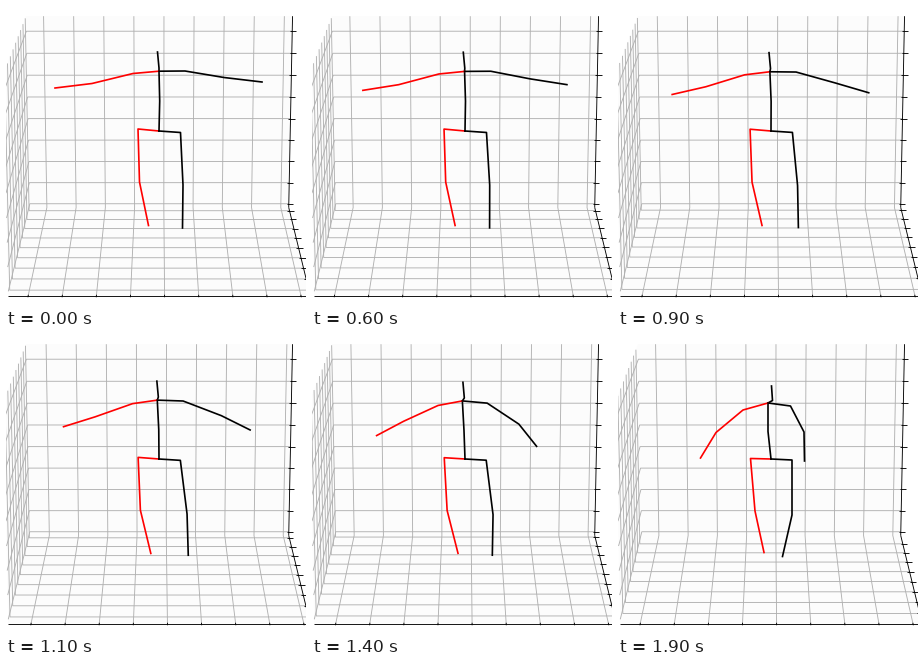
Animation, 300 px wide and 300 px high, one loop 2000 ms. Source, as a matplotlib script:

```python
import numpy as np
import matplotlib.pyplot as plt
from matplotlib.animation import FuncAnimation
from matplotlib.collections import LineCollection, PolyCollection

SIZE, DPI = 300, 80
FRAMES, STEP = 20, 100
LAST = (FRAMES - 1) * STEP

# Camera, in units of half the box width
ELEV = np.radians(15)
DIST, FOCAL = 12.4, 1755
CX, CY = 153.3, 141.2
TOP = 0.75          # half the box height
LIMIT = 0.96        # ticks stay inside the box margin
GAP = 0.2259        # tick spacing
HEIGHTS = TOP * LIMIT * (2 * np.arange(9) * 0.2 / 1.7 - 1)


def drift(t):
    """Slow start, still speeding up at the end."""
    return (t / LAST) ** 2.5


def swing(t):
    """Slow start and soft stop."""
    u = (t / LAST) ** 1.9
    return u * u * (3 - 2 * u)


def along(points, s):
    """Point on the line or quadratic curve given by its control points."""
    pts = np.asarray(points, float)
    while len(pts) > 1:
        pts = pts[:-1] + s * (pts[1:] - pts[:-1])
    return pts[0]


# Limbs: colour, easing, and the path of each joint after the root
HIP = [(153, 125)]
THORAX = [(153, 65.2), (149, 67), (150, 69)]
LIMBS = [
    ("red", drift, HIP, [                               # right leg
        [(132, 123), (132.5, 124.5)],
        [(133.5, 176), (137, 177)],
        [(142.5, 219.5), (148, 219.5), (146, 218.5)],
    ]),
    ("black", swing, HIP, [                             # left leg
        [(174.5, 126.5), (174, 126)],
        [(177, 179), (187.5, 181), (174, 181)],
        [(176.5, 222), (193, 220), (164.5, 222.5)],
    ]),
    ("black", drift, HIP, [                             # trunk and head
        [(153.7, 95), (150, 97.5)],
        THORAX,
        [(153, 62), (151, 64), (154.5, 66.5)],
        [(151.5, 46), (149.5, 48), (153.5, 52)],
    ]),
    ("red", drift, THORAX, [                            # right arm
        [(127, 67.5), (125, 76)],
        [(86, 77.5), (98, 98.5)],
        [(49, 82), (82.5, 124)],
    ]),
    ("black", swing, THORAX, [                          # left arm
        [(179, 65), (172.5, 72)],
        [(218, 71.5), (218, 91), (186, 98)],
        [(256, 76), (241, 114.5), (186.5, 127)],
    ]),
]


def limb_points(ease, root, joints, t):
    return [along(root, drift(t))] + [along(j, ease(t)) for j in joints]


def project(x, d, h):
    """Box point (sideways, towards viewer, up) to stage pixels."""
    c, s = np.cos(ELEV), np.sin(ELEV)
    k = FOCAL / (DIST - d * c - h * s)
    return CX + x * k, CY - (h * c - d * s) * k


def path(*points):
    return [project(*p) for p in points]


def ticks(offset):
    t = offset + GAP * np.arange(-6, 7)
    return t[np.abs(t) <= LIMIT]


def grid_lines(xs, ds):
    lines = [path((x, 1, -TOP), (x, -1, -TOP), (x, -1, TOP)) for x in xs]
    lines += [path((1, d, -TOP), (-1, d, -TOP), (-1, d, TOP)) for d in ds]
    lines += [path((1, -1, h), (-1, -1, h), (-1, 1, h)) for h in HEIGHTS]
    return lines


def tick_marks(xs, ds):
    a, b = -0.016, 0.032
    marks = [path((x, 1 + a, -TOP), (x, 1 + b, -TOP)) for x in xs]
    marks += [path((1 + a, d, -TOP), (1 + b, d, -TOP)) for d in ds]
    marks += [path((1 + a, -1, h), (1 + b, -1, h)) for h in HEIGHTS]
    return marks


fig = plt.figure(figsize=(SIZE / DPI, SIZE / DPI), dpi=DPI, facecolor="white")
ax = fig.add_axes([0, 0, 1, 1])
ax.set_xlim(0, SIZE)
ax.set_ylim(SIZE, 0)
ax.axis("off")

walls = [
    path((-1, -1, -TOP), (1, -1, -TOP), (1, -1, TOP), (-1, -1, TOP)),
    path((-1, -1, -TOP), (1, -1, -TOP), (1, 1, -TOP), (-1, 1, -TOP)),
    path((-1, -1, -TOP), (-1, 1, -TOP), (-1, 1, TOP), (-1, -1, TOP)),
]
ax.add_collection(PolyCollection(walls, facecolors="#fcfcfc",
                                 edgecolors="none"), autolim=False)


def add_lines(color, width, z, cap="butt"):
    lines = LineCollection([], colors=color, linewidths=width, zorder=z,
                           capstyle=cap)
    return ax.add_collection(lines, autolim=False)


grid = add_lines("#b0b0b0", 0.8, 2)
edges = add_lines("black", 0.8, 3)
marks = add_lines("black", 0.8, 3)
bones = [add_lines(limb[0], 1.5, 4, "projecting") for limb in LIMBS]

edges.set_segments([
    path((-1, 1, -TOP), (1, 1, -TOP)),
    path((1, 1, -TOP), (1, -1, -TOP)),
    path((1, -1, -TOP), (1, -1, TOP)),
])


def update(frame):
    t = frame * STEP
    # The tick grid sways aside once and slips back in depth
    xs = ticks(0.035 + 0.019 * np.exp(-((t - 1120) / 350) ** 2))
    ds = ticks(-0.011 - 0.093 * drift(t))
    grid.set_segments(grid_lines(xs, ds))
    marks.set_segments(tick_marks(xs, ds))
    for lines, (_, ease, root, joints) in zip(bones, LIMBS):
        lines.set_segments([limb_points(ease, root, joints, t)])
    return [grid, marks, *bones]


anim = FuncAnimation(fig, update, frames=FRAMES, interval=STEP,
                     init_func=lambda: update(0), repeat=True)
plt.show()
```
